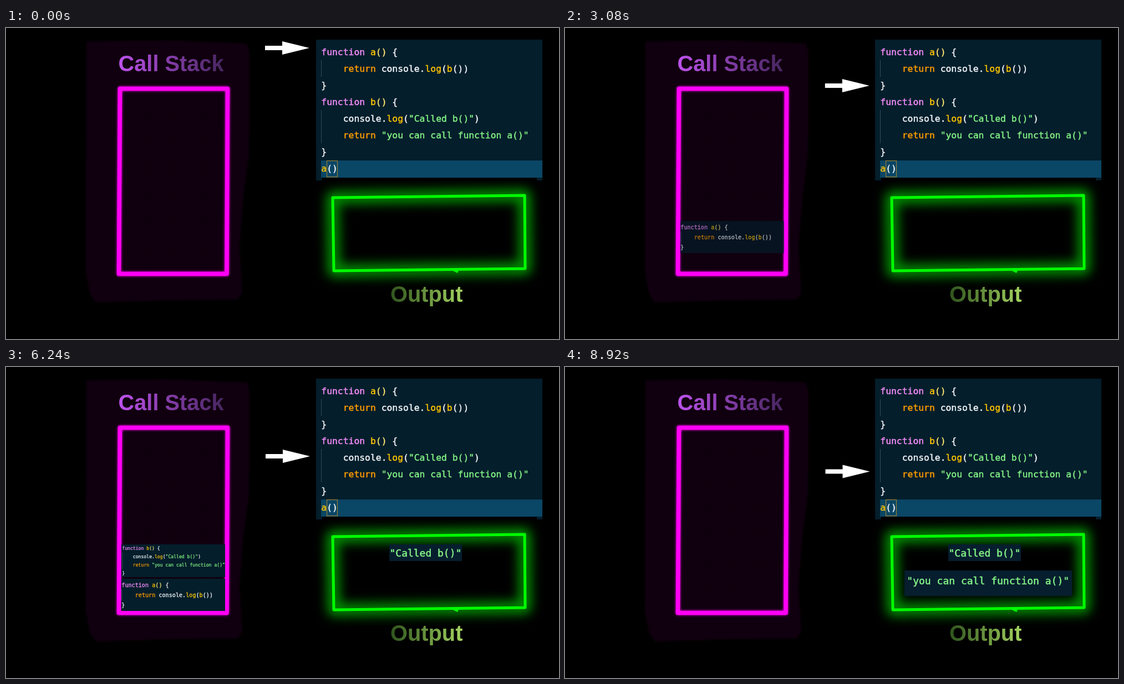
Recreate the animation shown at these times as an HTML page with a canvas. Size 997 by 561 pixels, loop 9640 ms.

```html
<!DOCTYPE html>
<html lang="en">
<head>
<meta charset="utf-8">
<title>Call stack</title>
<style>
html, body { margin: 0; width: 100%; height: 100%; overflow: hidden; background: #000; }
canvas { display: block; }
</style>
</head>
<body>
<canvas id="stage" width="997" height="561"></canvas>
<script>
const W = 997, H = 561, LOOP = 9640, STEP = 40, MOVE = 960, DRIFT = 399;
const MONO = '"DejaVu Sans Mono", monospace';
const SANS = '"Liberation Sans", Arial, sans-serif';
const PANEL = '#041e2b', GUIDE = '#334c59';

const FN_A = ['function a() {', '    return console.log(b())', '}'];
const FN_B = ['function b() {', '    console.log("Called b()")', '    return "you can call function a()"', '}'];

const stage = document.getElementById('stage').getContext('2d');
const backdrop = document.createElement('canvas');
backdrop.width = W;
backdrop.height = H;

function rect(c, color, x, y, w, h) {
  c.fillStyle = color;
  c.fillRect(x, y, w, h);
}

function trace(c, points) {
  c.beginPath();
  points.forEach(([x, y]) => c.lineTo(x, y));
  c.closePath();
}

function tokenColor(word) {
  if (word[0] === '"') return '#85f587';
  if (word === 'function') return '#f48cfa';
  if (word === 'return') return '#ff9d00';
  if (/^(log|a|b)$/.test(word)) return '#ffc600';
  if (word === '()') return '#ffe873';
  return '#f2f7fb';
}

// Syntax-coloured monospace text; `advance` is the width of one column.
function code(c, lines, x, y, advance, pitch = 0) {
  c.font = `${advance / 0.602}px ${MONO}`;
  c.lineWidth = advance * 0.045;
  lines.forEach((line, row) => {
    for (const m of line.matchAll(/"[^"]*"|\(\)(?= \{)|\w+|\S/g)) {
      c.fillStyle = c.strokeStyle = tokenColor(m[0]);
      const tx = x + m.index * advance, ty = y + row * pitch;
      c.fillText(m[0], tx, ty);
      c.strokeText(m[0], tx, ty);
    }
  });
}

function heading(c, text, x, y, from, to) {
  c.font = `bold 39.8px ${SANS}`;
  const g = c.createLinearGradient(x, 0, x + c.measureText(text).width, 0);
  g.addColorStop(0, from);
  g.addColorStop(1, to);
  c.fillStyle = g;
  c.fillText(text, x, y);
}

function neon(c, points, color, width, blur) {
  c.save();
  c.lineJoin = 'round';
  c.strokeStyle = color;
  c.lineWidth = width;
  c.shadowColor = color;
  c.shadowBlur = blur;
  trace(c, points);
  c.stroke();
  c.restore();
}

function drawStackArea(c) {
  c.save();
  c.fillStyle = c.shadowColor = '#10000f';
  c.shadowBlur = 6;
  trace(c, [[146, 25], [290, 23], [434, 29], [438, 45], [437, 230], [427, 305],
    [420, 395], [425, 478], [417, 489], [300, 490], [162, 494], [152, 478], [145, 440]]);
  c.fill();
  c.restore();
  for (let x = 255; x < 390; x += 48.2) rect(c, '#0a0009', x, 113, 1, 328);
  for (let y = 156; y < 440; y += 48.2) rect(c, '#0a0009', 208, y, 188, 1);
  neon(c, [[205.5, 109.5], [399.5, 109.5], [398, 443.5], [203.5, 443.5]], '#ff00f5', 7.5, 4);
  heading(c, 'Call Stack', 202.5, 78.3, '#bd52ec', '#46265f');
}

function drawOutputArea(c) {
  const frame = [[589, 306], [935, 302], [936, 434], [591, 438]];
  // Only the shadow of this offset stroke lands on the stage.
  c.save();
  c.shadowColor = 'rgba(0,255,0,.58)';
  c.shadowBlur = 20;
  c.shadowOffsetX = 2000;
  c.lineWidth = 22;
  c.lineJoin = 'round';
  trace(c, frame.map(([x, y]) => [x - 2000, y]));
  c.stroke();
  c.restore();
  neon(c, frame, '#00ff00', 5, 0);
  c.fillStyle = '#00ff00';
  trace(c, [[804, 437], [816, 437], [814, 442]]);
  c.fill();
  heading(c, 'Output', 693, 493.5, '#2f541d', '#a3d45f');
}

function drawEditor(c) {
  rect(c, PANEL, 559, 21, 408, 254);
  rect(c, '#0a4666', 568, 239, 399, 31);
  rect(c, '#000', 570, 270, 387, 5);
  rect(c, GUIDE, 568, 58, 1, 30);
  rect(c, GUIDE, 568, 148, 1, 60);
  c.strokeStyle = '#8f7c36';
  c.lineWidth = 1.3;
  c.strokeRect(578.5, 239.5, 19, 29);
  code(c, [...FN_A, ...FN_B, 'a()'], 568.3, 48.6, 9.85, 30.03);
}

function drawBackdrop() {
  const c = backdrop.getContext('2d');
  rect(c, '#000', 0, 0, W, H);
  drawStackArea(c);
  drawOutputArea(c);
  drawEditor(c);
}

const clamp = v => Math.min(1, Math.max(0, v));
const progress = (t, start, length = MOVE) => clamp((t - start) / length);
const easeBoth = p => (1 - Math.cos(Math.PI * p)) / 2;

// start time, then the x and y the arrow travels to
const ARROW = [[480, 468, 252], [2400, 469, 68], [4320, 468, 161], [7172, 469.5, 188.5]];

function drawArrow(c, t) {
  let x = 467, y = 36;
  for (const [start, tx, ty] of ARROW) {
    const e = easeBoth(progress(t, start));
    x += (tx - x) * e;
    y += (ty - y) * e;
  }
  c.fillStyle = '#fff';
  trace(c, [[x, y - 4], [x + 31, y - 4], [x + 31, y - 12], [x + 80, y],
    [x + 31, y + 12], [x + 31, y + 4], [x, y + 4]]);
  c.fill();
}

function stackA(c) {
  rect(c, PANEL, 208, 382, 187, 58);
  rect(c, GUIDE, 208.5, 402, 1, 19);
  code(c, FN_A, 208.3, 396.6, 6.1, 18.4);
}

function stackB(c) {
  rect(c, PANEL, 208, 320, 187, 59);
  rect(c, GUIDE, 209.5, 335, 1, 30);
  code(c, FN_B, 209.3, 330.4, 4.89, 14.8);
}

function outputB(c) {
  rect(c, '#061e2e', 691, 320, 131, 30);
  code(c, ['"Called b()"'], 691.5, 342.3, 10.82);
}

function outputA(c) {
  rect(c, '#061e2e', 612, 367, 302, 46);
  code(c, ['"you can call function a()"'], 616.3, 392.3, 10.85);
}

// dx, dy: direction a piece drifts in from; stack pieces leave the same way
const PIECES = [
  { draw: stackA, dx: 0, dy: -1, enter: 2400, leave: 8150, leaveTime: 770 },
  { draw: stackB, dx: 0, dy: -1, enter: 5252, leave: 7172, leaveTime: MOVE },
  { draw: outputB, dx: -1, dy: 0, enter: 5252 },
  { draw: outputA, dx: -1, dy: 0, enter: 7172 }
];

function drawPiece(c, t, piece) {
  const p = progress(t, piece.enter);
  const q = piece.leave ? progress(t, piece.leave, piece.leaveTime) : 0;
  if (p === 0 || q === 1) return;
  const shift = DRIFT * ((1 - p) ** 2 + q ** 2);
  c.save();
  c.globalAlpha = p ** 1.25 * (1 - q ** 1.25);
  c.translate(piece.dx * shift, piece.dy * shift);
  piece.draw(c);
  c.restore();
}

function render(now) {
  const t = Math.floor((now % LOOP) / STEP) * STEP;
  stage.drawImage(backdrop, 0, 0);
  PIECES.forEach(piece => drawPiece(stage, t, piece));
  drawArrow(stage, t);
}

drawBackdrop();
let origin = null;
function tick(now) {
  origin ??= now;
  render(now - origin);
  requestAnimationFrame(tick);
}
render(0);
requestAnimationFrame(tick);
</script>
</body>
</html>
```
